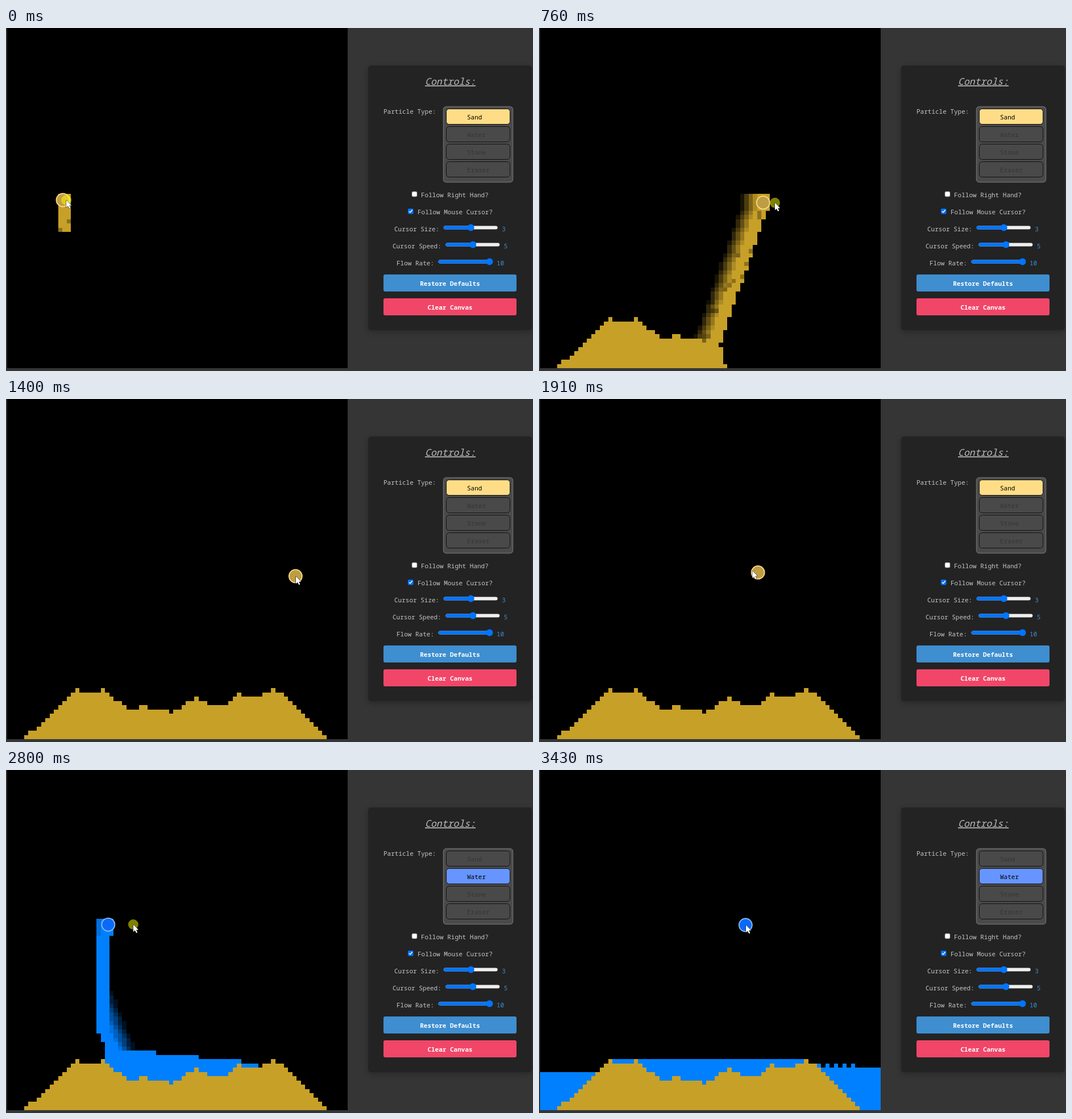
An HTML page with a canvas for the animation above (3.76 s loop, 927 by 604 pixels).

```html
<!DOCTYPE html>
<html lang="en">
<head>
<meta charset="utf-8">
<title>Falling sand</title>
<style>
  html, body { margin: 0; width: 927px; height: 604px; overflow: hidden; background: #353535; }
  canvas, svg { position: absolute; left: 0; top: 0; }
  svg { font: 11px "Noto Sans Mono", "DejaVu Sans Mono", monospace; fill: #c6c6c6; }
  .panel { fill: #232323; filter: drop-shadow(0 3px 5px #0004); }
  .title { font-size: 16.5px; font-style: italic; text-decoration: underline; fill: #bbb; }
  .button { font-weight: bold; fill: #fff; text-anchor: middle; }
  .value { fill: #3e8ed0; }
</style>
</head>
<body>
<canvas id="stage" width="927" height="604"></canvas>
<svg id="ui" width="927" height="604">
  <rect class="panel" x="637" y="66" width="288" height="466" rx="5"/>
  <text class="title" x="737" y="100">Controls:</text>
  <text x="664" y="150.5">Particle Type:</text>
  <rect x="769.5" y="138.5" width="122" height="133" rx="5" fill="#4a4a4a" stroke="#686868" stroke-width="1.5"/>
  <g id="options"></g>
  <rect x="714" y="288" width="9" height="9" rx="2" fill="#fff" stroke="#767676" stroke-width=".7"/>
  <text x="730" y="297.5">Follow Right Hand?</text>
  <rect x="707" y="318" width="9.5" height="9.5" rx="2" fill="#0075ff"/>
  <path d="M709 322.7l2 2 3.7-4.5" fill="none" stroke="#fff" stroke-width="1.5"/>
  <text x="724" y="327.5">Follow Mouse Cursor?</text>
  <g id="sliders"></g>
  <rect x="664" y="434" width="234" height="30" rx="3" fill="#3e8ed0"/>
  <text class="button" x="781" y="453.5">Restore Defaults</text>
  <rect x="664" y="476" width="234" height="30" rx="3" fill="#f14668"/>
  <text class="button" x="781" y="495.5">Clear Canvas</text>
</svg>
<script>
const LOOP = 3760, FRAMES = 86, LAST = 3430, STEP = 39.83;
const SIZE = 80, CELL = 599 / SIZE, LEFT = 2;
const ROW_TIME = 5.63, FALL = 190, LAG = 44;
const SAND = [199, 160, 40], WATER = [0, 128, 255];
const WATER_PICKED = 1950;

const ctx = document.getElementById('stage').getContext('2d');
const options = document.getElementById('options');

options.innerHTML = ['Sand', 'Water', 'Stone', 'Eraser'].map((name, i) =>
  `<rect x="774.5" y="${142.5 + 31 * i}" width="112" height="27" rx="5" stroke="#111"/>
   <text x="811" y="${160.5 + 31 * i}">${name}</text>`).join('');

document.getElementById('sliders').innerHTML = [
  ['Cursor Size:', 683, 48, 3],
  ['Cursor Speed:', 680, 48, 5],
  ['Flow Rate:', 687, 90, 10]
].map(([label, x, fill, value], i) => {
  const y = 351.5 + 30 * i, left = x + label.length * 6.6 + 7.5;
  return `<text x="${x}" y="${y + 6}">${label}</text>
    <rect x="${left}" y="${y - 3}" width="95" height="6" rx="3" fill="#efefef"/>
    <rect x="${left}" y="${y - 3}" width="${fill}" height="6" rx="3" fill="#0075ff"/>
    <circle cx="${left + fill}" cy="${y}" r="6" fill="#0075ff"/>
    <text class="value" x="${left + 102.5}" y="${y + 6}">${value}</text>`;
}).join('');

// Piecewise linear curve through [position, value] points
const curve = (...points) => at => {
  const i = points.findIndex(p => p[0] >= at);
  if (i < 1) return points.at(i)[1];
  const [a, from] = points[i - 1], [b, to] = points[i];
  return from + (to - from) * (at - a) / (b - a);
};

const mouseX = curve([-LAG, 100], [100, 120], [320, 209.5], [760, 416], [1120, 506], [1400, 510],
  [1670, 421], [2230, 296], [2390, 289], [2433, 269], [2620, 170], [2738, 170], [2792, 224],
  [3000, 345], [3400, 364]);
const mouseY = curve([0, 303], [1250, 311], [1700, 315], [2230, 276], [2792, 272], [3400, 273]);
const ringX = t => mouseX(t - LAG);

const pours = [
  { from: -36, to: 1040, top: 39, color: SAND },
  { from: 2378, to: 2960, top: 35, color: WATER }
];

// Outline of the finished dunes, in cells
const outline = curve([3, 0.25], [16, 12], [19, 11.4], [22, 12], [28, 7.7], [32, 8.2], [38, 6.8],
  [44, 10.2], [48, 8.2], [51, 8.3], [54, 11], [57, 10.2], [62, 12], [64, 11.1], [75, 0.2]);
const dunes = Array.from({ length: SIZE }, (_, c) => Math.floor(outline(c)));

const poolLeft = curve([2575, 38], [2790, 23], [3020, 0]);
const poolRight = curve([2575, 38], [2790, 57.9], [3000, 80]);
const poolLevel = curve([2575, 6], [2790, 14.95], [2960, 14.9], [3400, 12.1]);
const poolTilt = curve([2960, 0.1], [3250, 0]);
const sideFill = curve([2930, 0], [3400, 1]);

const toColumn = x => (x - LEFT) / CELL;
const edgeX = c => Math.round(LEFT + CELL * c);
const edgeY = r => Math.round(CELL * r);
const shade = (rgb, f) => `rgb(${rgb.map(v => Math.round(v * f))})`;
const random = n => { const s = Math.sin(n * 127.1) * 43758.5; return s - Math.floor(s); };

function block(c, top, bottom, color) {
  ctx.fillStyle = color;
  ctx.fillRect(edgeX(c), edgeY(top), edgeX(c + 1) - edgeX(c), edgeY(bottom) - edgeY(top));
}

const landing = t => toColumn(ringX(Math.min(t - FALL, pours[0].to)));

// The front of the pile is steeper the faster it moves, and settles to 45 degrees
function sandHeight(c, t) {
  const front = landing(t), slope = 1 + 0.08 * (front - landing(t - 100)) ** 2;
  const peak = Math.min(12.2, 0.57 * Math.sqrt(Math.max(0, t - FALL + 10)));
  const reach = peak - Math.max(0, 14 - c) - slope * Math.max(0, c - front);
  return Math.max(0, Math.min(dunes[c], Math.floor(reach)));
}

function waterHeight(c, t) {
  if (t < 2575 || c < poolLeft(t) || c > poolRight(t)) return 0;
  if (c >= 16 && c <= 62) return Math.floor(poolLevel(t) - poolTilt(t) * Math.abs(c - 25));
  const level = Math.floor(sideFill(t) * (c < 16 ? 9 : 10));
  const spill = t < 3250 ? dunes[c] + 1 : 0;
  const ripple = c > 64 && c < 74 ? c % 2 : 0;
  return Math.max(level + ripple, spill);
}

function drawPour({ from, to, top, color }, t, ground) {
  for (let r = top; r < SIZE; r++) {
    const born = t - Math.max(0, r - top - 2) * ROW_TIME;
    for (let age = 56; age >= 0; age -= 8) {
      const time = born - age;
      if (time < from || time > to) continue;
      const center = Math.floor(toColumn(ringX(time)));
      for (let c = center - 1; c <= center + 1; c++) {
        if (r >= SIZE - ground[c]) continue;
        const dark = color === SAND && random(c + 83 * Math.floor(born / ROW_TIME)) < 0.07;
        block(c, r, r + 1, shade(color, (1 - age / 64) * (dark ? 0.7 : 1)));
      }
    }
  }
}

function drawPointer(t) {
  const wet = t >= WATER_PICKED;
  const disc = (x, y, radius, fill) => {
    ctx.beginPath();
    ctx.arc(x, y, radius, 0, 2 * Math.PI);
    ctx.fillStyle = fill;
    ctx.fill();
  };
  disc(ringX(t), mouseY(t - LAG), 11.5, wet ? '#0a6af8' : '#bf9d42');
  ctx.strokeStyle = wet ? '#8fb8ef' : '#fad98c';
  ctx.lineWidth = 1.8;
  ctx.stroke();

  const x = mouseX(t), y = mouseY(t);
  if (pours.some(p => t >= p.from && t <= p.to)) disc(x, y, 9, 'rgba(255,255,0,.5)');

  ctx.save();
  ctx.translate(x, y);
  const arrow = new Path2D('M0 0V13L3 10.3 5.2 15 7.4 14 5.2 9.5H9.2Z');
  ctx.strokeStyle = '#000';
  ctx.lineWidth = 1;
  ctx.stroke(arrow);
  ctx.fillStyle = '#fff';
  ctx.fill(arrow);
  ctx.restore();
}

function updateOptions(t) {
  const picked = t < WATER_PICKED ? 0 : 1;
  [...options.children].forEach((el, i) => {
    const on = i >> 1 === picked;
    const color = i % 2 ? (on ? '#000' : '#353535') : on ? ['#ffdd87', '#6695ff'][picked] : '#494949';
    el.setAttribute('fill', color);
  });
}

function draw(t) {
  ctx.fillStyle = '#353535';
  ctx.fillRect(0, 0, 927, 604);
  ctx.fillStyle = '#000';
  ctx.fillRect(LEFT, 0, 599, 599);

  const ground = dunes.map((_, c) => {
    const sand = sandHeight(c, t), water = waterHeight(c, t);
    if (water > sand) block(c, SIZE - water, SIZE - sand, shade(WATER, 1));
    block(c, SIZE - sand, SIZE, shade(SAND, 1));
    return Math.max(sand, water);
  });
  for (const pour of pours) drawPour(pour, t, ground);
  drawPointer(t);
  updateOptions(t);
}

function tick() {
  const frame = Math.min(FRAMES, Math.floor(performance.now() % LOOP / STEP));
  draw(frame * LAST / FRAMES);
  requestAnimationFrame(tick);
}
tick();
</script>
</body>
</html>
```
